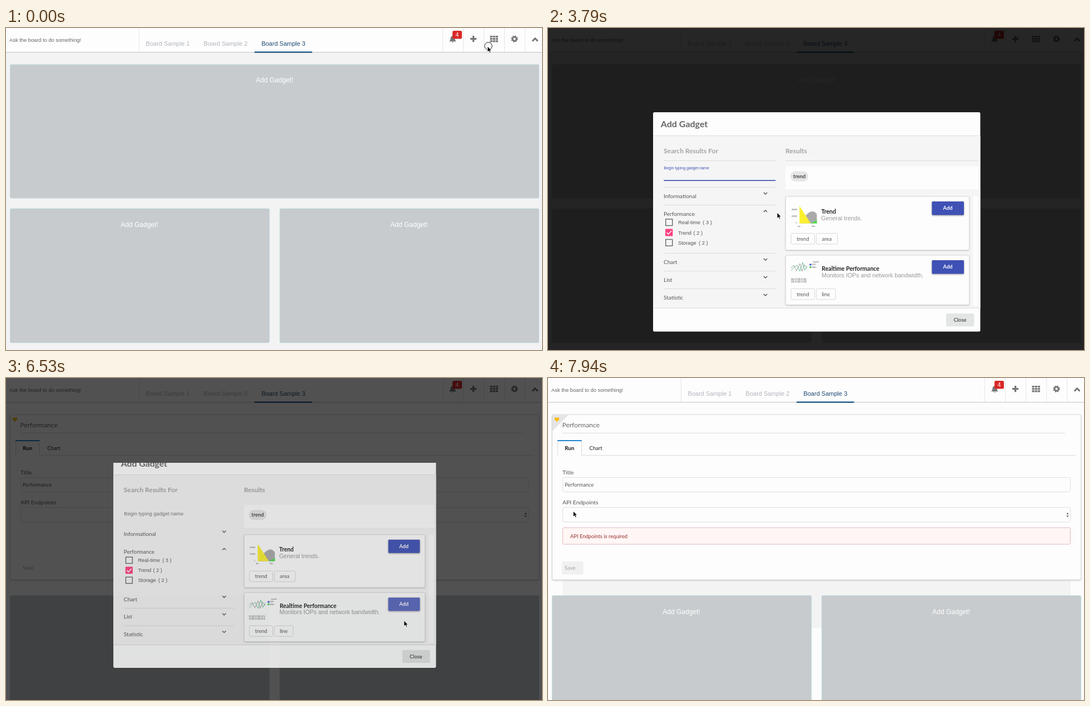
Animation, 964 px wide and 581 px high, one loop 8000 ms. Source, as an HTML page:

```html
<!DOCTYPE html>
<html lang="en">
<head>
<meta charset="utf-8">
<title>Add Gadget</title>
<style>
html, body { margin: 0; width: 100%; height: 100%; overflow: hidden; background: #f3f3f3; }
svg { display: block; width: 964px; height: 581px; font: 9.33px "Liberation Sans", Arial, sans-serif; }
.lato { font-family: Lato, sans-serif; }
.b { font-weight: 700; }
.mid { text-anchor: middle; }
.tile rect { fill: #c7cbce; stroke: #b9dbe0; stroke-width: .8; }
.tile text { font-size: 12px; fill: #fff; text-anchor: middle; }
.icons { fill: #767676; }
.line { fill: none; stroke: #dcdcdc; }
.field { fill: #fdfdfd; stroke: #dededf; }
.head { font-size: 12px; font-weight: 700; fill: #a2a2a2; }
.item { font-size: 10px; fill: #555; }
.box { fill: none; stroke: #666; stroke-width: 1.4; }
.chev { fill: none; stroke: #555; stroke-width: 1.4; }
.name { font-size: 10.5px; font-weight: 700; fill: #222; }
.desc { font: 10.67px "Liberation Sans", Arial, sans-serif; fill: #999; }
.tag rect { fill: #fdfdfd; stroke: #d8d8d8; }
.tag text { font-size: 9.5px; fill: #555; text-anchor: middle; }
.card { fill: #fdfdfd; stroke: #dadada; filter: drop-shadow(0 1px 1px #0003); }
.btn rect { fill: #3f51b5; filter: drop-shadow(0 1px 1.5px #0006); }
.btn text { fill: #fff; font-weight: 700; text-anchor: middle; }
.tiny { font-size: 3.4px; fill: #555; }
</style>
</head>
<body>
<svg viewBox="0 0 964 581">
  <defs>
    <clipPath id="crop"><rect y="151.5" width="964" height="430"/></clipPath>
    <clipPath id="cropLow"><rect y="153" width="964" height="428"/></clipPath>
    <g id="down"><path class="chev" d="M-3.2 -1.6L0 1.6L3.2 -1.6"/></g>
  </defs>

  <rect id="bg" width="964" height="581"/>

  <!-- top bar -->
  <rect width="964" height="43" fill="#fdfdfd"/>
  <rect id="hover" x="822" width="37.5" height="43" fill="#f1f1f1"/>
  <path d="M0 43.7H964" stroke="#d3d3d3" stroke-width="1.5"/>
  <path class="line" style="stroke:#e6e6e6" d="M239.5 0V43M785.5 0V43M822.5 0V43M859.5 0V43M896.5 0V43M933.5 0V43"/>
  <text x="6" y="25.3" fill="#666">Ask the board to do something!</text>
  <g font-size="11" fill="#b0b4bb">
    <text x="251.6" y="32">Board Sample 1</text>
    <text x="355.6" y="32">Board Sample 2</text>
    <text x="459.4" y="31.5" fill="#1b4872">Board Sample 3</text>
  </g>
  <rect x="447" y="42.5" width="103.5" height="2.2" fill="#0f4c81"/>
  <g class="icons">
    <path d="M797 24.2q2.6-2.4 2.6-5.8q.2-3.600 3.800-4.200q3.800.6 3.800 4.200q0 3.400 2.600 5.800zM801.600 25h3.600q-1.800 2.600-3.600 0z"/>
    <rect x="803" y="5" width="17" height="14.500" rx="2.500" fill="#db2828"/>
    <text class="mid" x="811.500" y="16" font-size="10.500" fill="#fff">4</text>
    <path id="plus" d="M839 14h3.200v4h4v3.200h-4v4h-3.200v-4h-4v-3.200h4z"/>
    <path d="M870.500 15.500H885M870.500 19.700H885M870.500 23.900H885" stroke="#767676" stroke-width="3.200" stroke-dasharray="4.200 .9"/>
    <circle cx="914.500" cy="19.700" r="3.500" fill="none" stroke="#767676" stroke-width="2.800"/>
    <circle cx="914.500" cy="19.700" r="5.300" fill="none" stroke="#767676" stroke-width="1.800" stroke-dasharray="2.300 1.863"/>
    <path d="M946.800 23.600L951.600 18.800L956.400 23.600" fill="none" stroke="#767676" stroke-width="3"/>
  </g>

  <rect id="strip" x="26" y="365" width="914" height="86" fill="#f3f3f3"/>

  <!-- empty top tile, later replaced by the form -->
  <g class="tile" id="wide">
    <rect x="7.400" y="65.900" width="951.200" height="241.200" rx="2"/>
    <text x="483" y="98">Add Gadget!</text>
  </g>
  <g id="form" class="lato">
    <rect class="card" x="7.500" y="66" width="951" height="298" rx="2"/>
    <path id="ribbon" d="M8 66.500H37L8 95.500Z" fill="#e5e5e5"/>
    <path d="M16 79.300L11.900 74.800q-1-2.400 1-3.500q2-.6 3.100 1.200q1.100-1.800 3.100-1.200q2 1.100 1 3.500z" fill="#fbbd08"/>
    <text x="25.500" y="89" font-size="12" fill="#666">Performance</text>
    <path class="line" d="M26 99.500H930M60.500 139.500H949M17.500 139.500V113M60.500 113V139.500"/>
    <rect x="17" y="112" width="43.500" height="2" fill="#2185d0"/>
    <text class="b" x="30.300" y="130" font-size="9.600" fill="#111">Run</text>
    <text x="74.300" y="130" font-size="9.600" fill="#222">Chart</text>
    <g font-size="10.400" fill="#555">
      <text x="26" y="174">Title</text>
      <text x="26" y="228">API Endpoints</text>
    </g>
    <rect class="field" x="26.500" y="179.500" width="913" height="26" rx="3"/>
    <rect class="field" x="26.500" y="233.500" width="913" height="26.500" rx="3"/>
    <text x="30" y="195.600" fill="#555">Performance</text>
    <path d="M932.300 246L934.500 242.500L936.700 246ZM932.300 248L934.500 251.500L936.700 248Z" fill="#777"/>
    <g id="alert">
      <rect x="26.500" y="270" width="913" height="30" rx="2.500" fill="#fff6f5" stroke="#e0b9b9"/>
      <text x="40" y="288.600" fill="#952f2d">API Endpoints is required</text>
    </g>
    <rect id="save" x="25" y="331" width="38.500" height="23.500" rx="2" fill="#f0f0f0"/>
    <text x="30" y="346" fill="#a5a5a5" font-size="9.600">Save</text>
  </g>
  <g class="tile" id="pair">
    <rect x="7.400" y="325.900" width="466.400" height="242" rx="2"/>
    <rect x="492.400" y="325.900" width="466.200" height="242" rx="2"/>
    <text x="240" y="359">Add Gadget!</text>
    <text x="725" y="359">Add Gadget!</text>
  </g>

  <rect id="dim" width="964" height="581"/>

  <!-- dialog -->
  <g id="clip" clip-path="url(#crop)">
  <g id="modal" class="lato">
    <rect x="189" y="152" width="588.500" height="395.700" rx="2.500" fill="#fdfdfd"/>
    <rect x="189" y="194.500" width="588.500" height="311" fill="#f5f5f5"/>
    <path class="line" d="M189 194.500H777.500M189 505.500H777.500"/>
    <text class="b" x="202.800" y="179" font-size="16" fill="#666">Add Gadget</text>
    <text class="head" x="208" y="226.300">Search Results For</text>
    <text class="head" x="427.300" y="226.300">Results</text>
    <path id="rules" class="line" d="M208 239.500H409.500M427 239.500H773.500M208 287.500H409.500M208 319.500H409.500M208 406.500H409.500"/>
    <path class="line" d="M208 438.500H409.500M208 470.500H409.500"/>

    <text id="label" style="font-family:'Liberation Sans',Arial,sans-serif">Begin typing gadget name</text>
    <rect id="under" y="274.300" height="1.700" fill="#3f51b5"/>
    <rect id="caret" x="208.500" y="261" width="1" height="11" fill="#888"/>

    <g class="item">
      <text x="208" y="306.700">Informational</text>
      <text x="208" y="338.900">Performance</text>
      <text x="208" y="425.800">Chart</text>
      <text x="208" y="457.800">List</text>
      <text x="208" y="489.900">Statistic</text>
    </g>
    <use href="#down" x="391" y="298.300"/>
    <path class="chev" d="M387.800 331.900L391 328.700L394.200 331.900"/>
    <use href="#down" x="391" y="417.500"/>
    <use href="#down" x="391" y="449.500"/>
    <use href="#down" x="391" y="481.500"/>
    <rect class="box" x="211.700" y="344.900" width="12" height="11.600"/>
    <rect x="211" y="362.500" width="13.300" height="13" rx="1" fill="#ff4081"/>
    <path d="M213.500 369L216.500 372L222 366" fill="none" stroke="#fff" stroke-width="1.500"/>
    <rect class="box" x="211.700" y="381.500" width="12" height="11.600"/>
    <g fill="#555" style="font-family:'Liberation Sans',Arial,sans-serif">
      <text x="234" y="354">Real-time</text><text x="278.300" y="354">( 3 )</text>
      <text x="234" y="372.500">Trend</text><text x="261.500" y="372.500">( 2 )</text>
      <text x="234" y="390.700">Storage</text><text x="271" y="390.700">( 2 )</text>
    </g>

    <rect x="427" y="249.500" width="347" height="41.500" fill="#fdfdfd"/>
    <rect x="436" y="258.500" width="32.300" height="18.500" rx="9" fill="#e6e6e6"/>
    <text class="b mid" x="452.200" y="271" fill="#444">trend</text>
    <rect x="764.500" y="304" width="9" height="197" fill="#fdfdfd"/>

    <rect class="card" x="427.500" y="304" width="330" height="96.500" rx="2"/>
    <path d="M454 352.500Q466 330 477 331Q481 332 483.500 336V352.500Z" fill="#aaa"/>
    <path d="M452.300 321L472.500 352.500H452.300Z" fill="#fbf02f"/>
    <path d="M472 352.500Q479 350 483.500 346V352.500Z" fill="#4be04b"/>
    <g class="tiny">
      <text x="438" y="328.500">40000</text><text x="438" y="340.500">20000</text><text x="445.500" y="352.500">1</text>
      <text x="449" y="358.500">Jan</text><text x="474.500" y="358.500">Nov</text>
    </g>
    <text class="name" x="491.500" y="334.700">Trend</text>
    <text class="desc" x="491.300" y="347">General trends.</text>

    <rect class="card" x="427.500" y="410" width="330" height="89.500" rx="2"/>
    <path d="M437 433L442 428L447 438L453 425L457 439L461 427L466 434" fill="none" stroke="#999" stroke-width=".9"/>
    <path d="M437 438L443 431L448 428L453 439L458 423L462 437L466 429" fill="none" stroke="#5fc08a" stroke-width=".9"/>
    <rect x="470.500" y="425.500" width="3" height="3" fill="#3344cc"/>
    <rect x="470.500" y="430" width="3" height="3" fill="#33cc55"/>
    <g class="tiny"><text x="476.500" y="423">Legend</text><text x="474.500" y="428.300">IOPs</text><text x="474.500" y="432.800">MB/s</text></g>
    <g id="ticks" class="tiny"></g>
    <text class="name" x="492.300" y="437.700">Realtime Performance</text>
    <text class="desc" x="492" y="449.700">Monitors IOPs and network bandwidth.</text>

    <g class="tag">
      <rect x="437" y="370.500" width="42.500" height="19.500" rx="2"/><text x="458.300" y="383.700">trend</text>
      <rect x="482.500" y="370.500" width="38" height="19.500" rx="2"/><text x="501.300" y="383.700">area</text>
      <rect x="437" y="470.500" width="42.500" height="19.500" rx="2"/><text x="458.300" y="483.700">trend</text>
      <rect x="482.500" y="470.500" width="34.500" height="19.500" rx="2"/><text x="499.700" y="483.700">line</text>
    </g>
    <g class="btn">
      <rect x="690.500" y="313" width="57.500" height="24.500" rx="1.500"/><text x="719" y="328.400">Add</text>
      <rect x="690.500" y="419" width="57.500" height="24.500" rx="1.500"/><text x="719" y="434.400">Add</text>
    </g>
    <rect id="ripple" x="690.500" y="419" width="57.500" height="24.500" rx="1.500" fill="#fff" opacity=".14"/>
    <rect x="716" y="515" width="50.500" height="23.500" rx="2" fill="#e4e5e5"/>
    <text class="b mid" x="741" y="530" fill="#555">Close</text>
  </g>
  </g>

  <!-- pointer -->
  <circle id="ring" r="6.700" fill="none" stroke="#222" stroke-width="1"/>
  <g id="cursor" stroke-linejoin="round">
    <path id="arrow" d="M0 0V10.500L2.500 8.300L4.200 12L6 11.200L4.400 7.700H7.500Z" fill="#000" stroke="#fff" stroke-width=".9"/>
    <g id="beam" fill="none">
      <path d="M-2.500 -5.500Q0 -5.500 0 -4V4Q0 5.500 -2.500 5.500M2.500 -5.500Q0 -5.500 0 -4M2.500 5.500Q0 5.500 0 4M-1.500 1.500H1.500" stroke="#fff" stroke-width="2.200"/>
      <path d="M-2.500 -5.500Q0 -5.500 0 -4V4Q0 5.500 -2.500 5.500M2.500 -5.500Q0 -5.500 0 -4M2.500 5.500Q0 5.500 0 4M-1.500 1.500H1.500" stroke="#000"/>
    </g>
    <path id="hand" d="M-1 .8Q.3 -.8 1.600 .8V5Q3 4.200 4 5.400Q5.600 4.800 6.300 6Q8 6 8 8V10.500L6.500 14H.5L-4 8.500Q-3.500 6.500 -1 8.300Z" fill="#fff" stroke="#000" stroke-width=".9"/>
  </g>
</svg>

<script>
const LOOP = 8000;
const $ = id => document.getElementById(id);
const show = (id, on) => { $(id).style.display = on ? '' : 'none'; };
const set = (id, attrs) => { for (const k in attrs) $(id).setAttribute(k, attrs[k]); };

// Each run: first step, last step, number of steps, pointer position at its end.
const runs = [
  [0, 0, 1, 866, 33], [90, 90, 1, 866, 34.5], [300, 300, 1, 866, 35.5], [480, 480, 1, 866, 36],
  [650, 650, 1, 866, 36.5], [830, 1270, 6, 842.5, 21.5], [1620, 1790, 3, 842.5, 21.5],
  [1970, 2060, 2, 842.5, 21], [2150, 2150, 1, 840.3, 23], [2390, 2390, 1, 764, 77],
  [2600, 2690, 2, 648, 165], [2900, 3260, 5, 524, 262], [3530, 3790, 4, 412, 333],
  [3970, 4320, 5, 340, 358], [4500, 4760, 4, 502, 433], [4940, 5370, 6, 671, 440],
  [5460, 5720, 4, 716.5, 437], [5810, 5890, 2, 716.5, 437], [6070, 6370, 4, 716.5, 437],
  [6530, 6630, 2, 715, 438], [6840, 7020, 2, 716, 437.5],
  [7190, 7660, 6, 15, 262], [7750, 7940, 3, 45.3, 240]
];
const steps = [];
let px = 866, py = 33;
for (const [from, to, n, x, y] of runs) {
  for (let i = 0; i < n; i++) {
    const k = (i + 1) / n;
    const t = n > 1 ? Math.round((from + (to - from) * i / (n - 1)) / 10) * 10 : from;
    steps.push({ t, x: px + (x - px) * k, y: py + (y - py) * k });
  }
  px = x; py = y;
}

$('ticks').innerHTML = Array.from({ length: 8 }, (_, i) =>
  `<text transform="translate(${439.5 + i * 3.7} 460) rotate(-90)">10:0${i}</text>`).join('');

function dialogAt(t) {
  if (t < 2060 || t >= 6840) return null;
  if (t < 2150) return { alpha: .6, dim: .5, scale: .96, y: 195 };
  if (t < 6530) return { alpha: 1, dim: .85, scale: 1, y: 195 };
  if (t < 6630) return { alpha: .85, dim: .68, scale: .986, y: 175.3 };
  return { alpha: .35, dim: .32, scale: .94, y: 175.3 };
}

function drawLabel(t) {
  const float = t < 2390 ? 0 : t < 6070 ? 1 : Math.max(0, 1 - (t - 5980) / 270);
  const focus = t >= 2390 && t < 6070;
  set('label', {
    x: 208.5, y: 269 - 13.8 * float,
    'font-size': 9.33 - 2.33 * float,
    fill: focus ? '#3f51b5' : '#777'
  });
  const half = t < 2150 ? 15 : t < 2390 ? 50 : 100.5;
  set('under', { x: 308.8 - half, width: half * 2 });
  show('under', t < 6250);
  show('caret', t < 6070 && (t - 2010) % 1060 < 530);
}

function draw(t) {
  const step = steps.findLast(s => s.t <= t);
  t = step.t;
  const added = t >= 6530;

  $('bg').setAttribute('fill', added ? '#fcfcfc' : '#f3f3f3');
  show('wide', !added);
  show('form', added);
  show('ribbon', t >= 6630);
  show('strip', t >= 7020);
  show('save', t >= 7020);
  set('alert', { opacity: t < 6630 ? 0 : t < 6840 ? .2 : t < 7020 ? .55 : 1 });
  set('pair', { transform: `translate(0 ${added ? 66.7 : 0})` });
  show('hover', t >= 1970 && t < 2390);
  set('plus', { fill: t >= 2060 && t < 2390 ? '#222' : '#767676' });

  const d = dialogAt(t);
  show('dim', d);
  show('clip', d);
  if (d) {
    set('dim', { opacity: d.dim });
    set('clip', { 'clip-path': added ? 'url(#cropLow)' : 'url(#crop)' });
    set('modal', {
      opacity: d.alpha,
      transform: `translate(483 ${d.y}) scale(${d.scale}) translate(-483 -195)`
    });
    show('rules', !added);
    show('ripple', t >= 6070);
    drawLabel(t);
  }

  const hand = t >= 5720 && t < 6530;
  const beam = t >= 5110 && t < 5720;
  show('hand', hand);
  show('beam', beam);
  show('arrow', !hand && !beam);
  set('cursor', { transform: `translate(${step.x} ${step.y})` });

  const pressed = t < 90 || (t >= 650 && t < 830) || (t >= 1620 && t < 1790) || (t >= 5810 && t < 6070);
  show('ring', pressed);
  set('ring', hand ? { cx: 720, cy: 443.5 } : { cx: step.x + 1.5, cy: step.y - .5 });
}

const start = performance.now();
function tick() {
  draw((performance.now() - start) % LOOP);
  requestAnimationFrame(tick);
}
tick();
</script>
</body>
</html>
```
